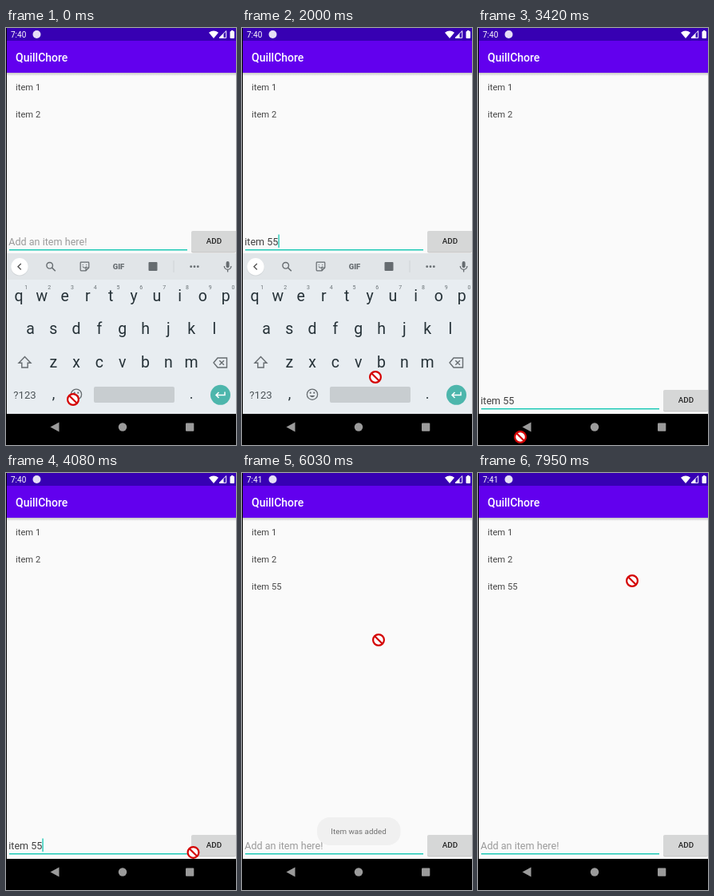
Write an HTML page with a canvas that moves like this. It is 288 px wide and 522 px high and loops after 8000 ms.

```html
<!DOCTYPE html>
<html lang="en">
<head>
<meta charset="utf-8">
<title>To-do list demo</title>
<style>
  html, body { margin: 0; width: 100%; height: 100%; overflow: hidden; background: #000; }
  canvas { display: block; }
</style>
</head>
<body>
<canvas id="stage" width="288" height="522"></canvas>
<script>
const ctx = document.getElementById('stage').getContext('2d');
const LOOP = 8000, ROW_SHIFT = 199;
const TEAL = '#1fc9b6', KEY = '#263238', ICON = '#666c70';

// Timelines: [start time, value], each value holds until the next entry.
const typed = [[0, ''], [560, 'i'], [680, 'it'], [1080, 'ite'], [1230, 'item '],
  [1630, 'item 5'], [1750, 'item 55'], [4510, '']];
const suggestions = [[0, null], [560, ['I', 'i', 'is']], [680, ['it', 'it', "it's"]],
  [1080, ['ite', 'item', 'itemsushi']], [1230, ['is', 'and', 'in']], [1630, null]];
const caretOn = [[0, false], [560, true], [2300, false], [2850, true], [3420, false],
  [3950, true], [5030, false], [5510, true], [6030, false], [6560, true],
  [7060, false], [7550, true], [7950, false]];
const buttonColor = [[0, '#d6d7d7'], [4510, '#c6c7c7'], [4630, '#cccdcd'],
  [4770, '#d2d3d3'], [4910, '#d6d7d7']];
const toastText = [[0, 0], [4630, .4], [4770, .8], [4910, 1], [6680, .6], [6800, .2], [6940, 0]];

// Pointer moves: start, step length, step count, x, y.
const pointerMoves = [[0, 1, 1, 84, 465], [2000, 1, 1, 167, 437], [2150, 1, 1, 200, 437],
  [2300, 1, 1, 269, 462], [2450, 125, 3, 74, 514], [2850, 1, 1, 53, 513], [3000, 1, 1, 53, 512],
  [3570, 126, 6, 249, 472], [4910, 120, 6, 172, 224], [5660, 1, 1, 171, 209], [6940, 122, 6, 193, 135]];

const valueAt = (list, t) => list.filter(([start]) => start <= t).pop()[1];

function pointerAt(t) {
  let x = 84, y = 465;
  for (const [start, step, count, toX, toY] of pointerMoves) {
    if (t < start) break;
    const p = Math.min(count, Math.floor((t - start) / step) + 1) / count;
    const eased = p * p * (3 - 2 * p);
    x += (toX - x) * eased;
    y += (toY - y) * eased;
  }
  return [x, y];
}

function rect(x, y, w, h, color, radius = 0) {
  ctx.fillStyle = color;
  ctx.beginPath();
  ctx.roundRect(x, y, w, h, radius);
  ctx.fill();
}

function disc(x, y, r, color) {
  ctx.fillStyle = color;
  ctx.beginPath();
  ctx.arc(x, y, r, 0, 7);
  ctx.fill();
}

function text(str, x, y, size, color, align = 'left', weight = 400) {
  ctx.font = `${weight} ${size}px Roboto, sans-serif`;
  ctx.textAlign = align;
  ctx.fillStyle = color;
  ctx.fillText(str, x, y);
}

function shape(d, x, y, color, width = 0) {
  ctx.save();
  ctx.translate(x, y);
  const path = new Path2D(d);
  if (width) {
    ctx.strokeStyle = color;
    ctx.lineWidth = width;
    ctx.stroke(path);
  } else {
    ctx.fillStyle = color;
    ctx.fill(path);
  }
  ctx.restore();
}

const ring = r => `M${-r} 0a${r} ${r} 0 1 0 ${2 * r} 0a${r} ${r} 0 1 0 ${-2 * r} 0`;

function drawApp(t) {
  rect(1, 0, 287, 483, '#fafafa');
  const shadow = ctx.createLinearGradient(0, 56, 0, 60);
  shadow.addColorStop(0, '#00000038');
  shadow.addColorStop(1, '#00000000');
  rect(1, 56, 287, 4, shadow);
  rect(1, 0, 287, 16, '#3700b3');
  rect(1, 16, 287, 40, '#6200ee');

  text(t < 4510 ? '7:40' : '7:41', 6, 12, 10, '#fff');
  disc(38.5, 8, 5, '#e6dff6');
  shape('M0 5L-6 -2.3Q0 -6.5 6 -2.3Z', 260, 8, '#fff');
  shape('M-4.5 4.3H4.2V-4.3Z', 271.5, 8, '#fff', 1);
  shape('M-4.5 4.5H1V-1Z', 271.5, 8, '#fff');
  rect(280.5, 4, 5.5, 9, '#fff', 1);
  rect(282, 3, 2.5, 2, '#fff');

  text('QuillChore', 12, 42, 14, '#fff', 'left', 500);
  const items = ['item 1', 'item 2'].concat(t < 4510 ? [] : 'item 55');
  items.forEach((item, i) => text(item, 12, 77.5 + 34 * i, 11.2, '#484848'));
}

function drawInput(t) {
  const value = valueAt(typed, t);
  ctx.save();
  ctx.translate(0, t < 3300 ? 0 : ROW_SHIFT);
  text(value || 'Add an item here!', 3.2, 272, 12.6, value ? '#404040' : '#9a9a9a');
  const end = 3.2 + (value ? ctx.measureText(value).width : 0);
  if (t >= 560 && t < 1230) rect(3, 273.3, end - 3, 1, '#404040');
  if (valueAt(caretOn, t)) rect(end, 258.5, 1.4, 16.5, TEAL);
  rect(4, 277, 223, 1.4, TEAL);
  rect(232, 255, 56, 26.5, '#00000030', 2);
  rect(232, 254, 56, 26, valueAt(buttonColor, t), [2, 0, 0, 2]);
  text('ADD', 260.5, 270.2, 9.8, '#222', 'center', 500);
  ctx.restore();
}

function drawToolbar() {
  shape(ring(3.8), 54.7, 297.3, ICON, 1.4);
  shape('M0 0L4.3 4.3', 57.5, 300, ICON, 1.6);
  shape('M-5.3 -4.5Q-5.3 -5.3 -4.5 -5.3H4.5Q5.3 -5.3 5.3 -4.5V1.5L1.5 5.3H-4.5Q-5.3 5.3 -5.3 4.5ZM5 1.5H1.5V5', 98.5, 298.5, ICON, 1.2);
  shape('M-2.6 0Q0 3.4 2.6 0M-2.2 -2.6v1.2M2.2 -2.6v1.2', 98.5, 298.5, ICON, 1.1);
  text('GIF', 141, 302, 9.5, ICON, 'center', 900);
  rect(178.5, 293, 11, 11, ICON, 1);
  rect(209.5, 291, 1, 15, '#cfd3d6');
  for (const x of [231.7, 236, 240.3]) disc(x, 298.7, 1.4, ICON);
}

function drawSuggestions(words) {
  words.forEach((word, i) => {
    const best = i === 1 && word === 'item';
    text(word, [64.5, 145.5, 225.5][i], 303.5, 13, best ? '#111' : '#7c8286', 'center', best ? 700 : 400);
  });
  rect(103, 290, 1, 17, '#cfd3d6');
  rect(188, 290, 1, 17, '#cfd3d6');
}

function drawKeyboard(t) {
  const words = valueAt(suggestions, t);
  rect(1, 282, 287, 201, '#e8edf1');
  rect(1, 282, 287, 33, '#e1e5e8');
  disc(17, 299.5, 11, '#d3d7da');
  disc(17, 298.8, 10.7, '#fff');
  shape(words ? 'M-1.8 -3.8L2 0L-1.8 3.8' : 'M1.8 -3.8L-2 0L1.8 3.8', 17, 298.8, '#555', 1.4);
  words ? drawSuggestions(words) : drawToolbar();
  rect(275.6, 292, 4, 8.3, ICON, 2);
  shape('M-4.3 -1.5a4.3 4.3 0 0 0 8.6 0M0 3V6', 277.6, 299.5, ICON, 1.3);

  const rows = [['qwertyuiop', 16, 341.5], ['asdfghjkl', 30.5, 383], ['zxcvbnm', 59.3, 425]];
  for (const [letters, left, baseline] of rows)
    [...letters].forEach((key, i) => text(key, left + 28.8 * i, baseline, 19.5, KEY, 'center'));
  [...'1234567890'].forEach((digit, i) => text(digit, 25.3 + 28.8 * i, 327, 7, '#6b7377', 'center'));

  shape('M0 -7L7.5 .8H3.7V6.5H-3.7V.8H-7.5Z', 23.5, 418.5, ICON, 1.4);
  shape('M-8.5 0L-3.5 -6H8V6H-3.5ZM-1.2 -2.8L4.4 2.8M4.4 -2.8L-1.2 2.8', 268.5, 419, ICON, 1.4);
  text('?123', 23.5, 464, 13.2, '#4b5357', 'center');
  text(',', 59.5, 464, 18, KEY, 'center');
  text('.', 232, 464, 18, KEY, 'center');
  shape(ring(6.6), 88, 458.7, ICON, 1.3);
  shape('M-3.5 1.3Q0 6 3.5 1.3Z', 88, 458.7, ICON);
  disc(85.7, 456.7, 1.1, ICON);
  disc(90.3, 456.7, 1.1, ICON);
  rect(110, 449, 101, 20, '#c8cdd0', 2);
  disc(268.5, 459.3, 12.5, '#4db6ac');
  shape('M5.5 -3.5V.5H-5M-2 -3L-5.5 .5L-2 4', 268.5, 459, '#fff', 1.5);
}

function drawToast(t) {
  if (t < 4630 || t >= 6940) return;
  rect(94, 431, 104.5, 35, '#f0f0f0', 16);
  ctx.globalAlpha = valueAt(toastText, t);
  text('Item was added', 146, 452.2, 9.8, '#707070', 'center');
  ctx.globalAlpha = 1;
}

function drawNavigation() {
  rect(0, 483, 288, 39, '#000');
  shape('M-5.5 0L5.5 -6V6Z', 61, 499.5, '#9b9b9b');
  disc(146, 499.5, 5.2, '#9b9b9b');
  rect(225, 494.5, 10.3, 10.3, '#9b9b9b', 1);
}

function drawPointer(t) {
  const [x, y] = pointerAt(t);
  disc(x, y, 7.5, '#fff');
  shape(ring(6.9), x, y, '#d40000', 2.2);
  shape('M-4.8 -4.8L4.8 4.8', x, y, '#d40000', 2.2);
}

function draw(t) {
  rect(0, 0, 288, 522, '#000');
  drawApp(t);
  drawInput(t);
  if (t < 3300) {
    drawKeyboard(t);
  } else if (t < 3420) {
    ctx.save();
    ctx.globalAlpha = .6;
    ctx.translate(0, 90);
    drawKeyboard(t);
    ctx.restore();
  }
  drawToast(t);
  drawNavigation();
  drawPointer(t);
}

const begin = performance.now();
function frame() {
  draw((performance.now() - begin) % LOOP);
  requestAnimationFrame(frame);
}
frame();
</script>
</body>
</html>
```
